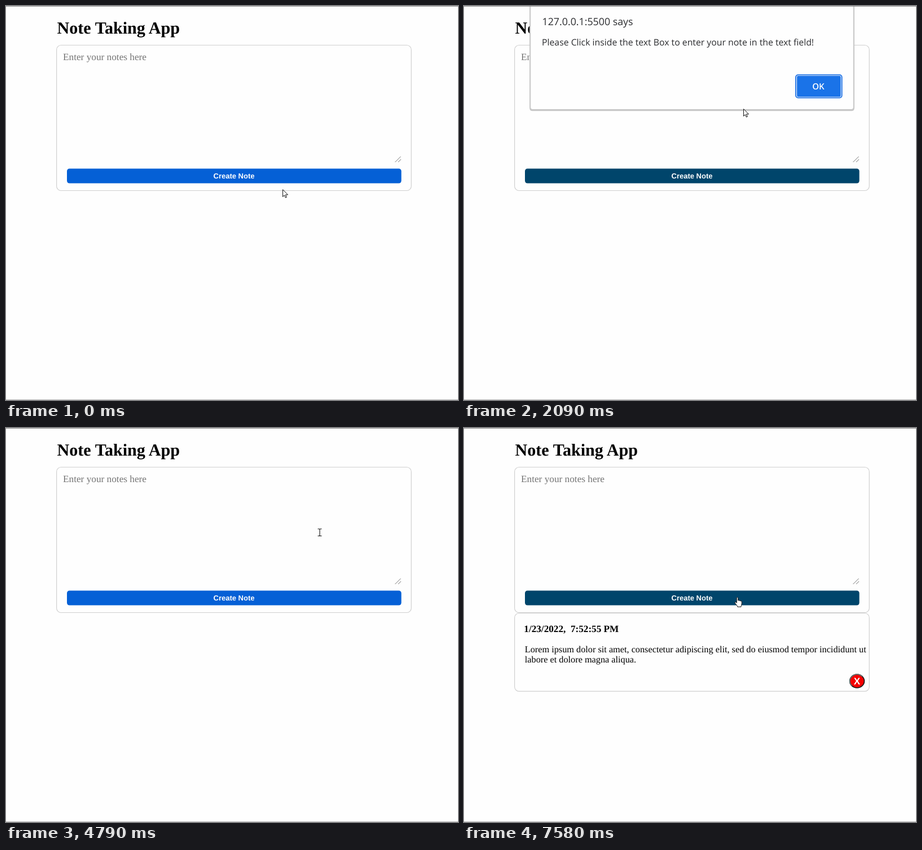
Animation, 801 px wide and 699 px high, one loop 8000 ms. Source, as an HTML page:

```html
<!DOCTYPE html>
<html lang="en">
<head>
<meta charset="utf-8">
<title>Note Taking App</title>
<style>
  html, body { margin: 0; width: 100%; height: 100%; overflow: hidden; background: #fefefe; }
  svg { display: block; }
  text { text-rendering: geometricPrecision; white-space: pre; }
  .serif { font-family: "Liberation Serif", "Times New Roman", serif; }
  .sans { font-family: "Liberation Sans", Arial, sans-serif; font-weight: bold; fill: #fff; text-anchor: middle; }
  .mono { font: 14.91px "Noto Sans Mono", monospace; }
  .ui { font-family: "Open Sans", "Noto Sans", sans-serif; fill: #2b2c2f; }
  .card { fill: none; stroke: #d0d0d0; stroke-width: 1.2; }
  .cursor { fill: #fff; stroke: #111; stroke-width: 1; stroke-linejoin: round; }
</style>
</head>
<body>
<svg width="801" height="699" viewBox="0 0 801 699">
  <defs>
    <clipPath id="okClip"><rect x="590" y="124" width="78" height="37" rx="2"/></clipPath>
  </defs>

  <text class="serif" x="90.5" y="48.5" font-size="30.1" font-weight="bold">Note Taking App</text>
  <rect class="card" x="89.6" y="69.5" width="628.6" height="258" rx="8"/>
  <text class="serif" x="101" y="95.5" font-size="17.25" fill="#757575">Enter your notes here</text>

  <rect id="focus" x="108" y="111.5" width="592.5" height="166.5" rx="4" fill="#fefefe" stroke="#0a5bcb" stroke-width="1.8"/>
  <path d="M689.5 277L699.5 267M695 277L700 272" stroke="#777" fill="none"/>
  <g id="entry" class="mono">
    <text x="117.5" y="136">Lorem ipsum dolor sit amet, consectetur adipiscing elit, sed do</text>
    <text x="117.5" y="155.7">eiusmod tempor incididunt ut labore et dolore magna aliqua.</text>
  </g>
  <rect id="caret" width="1.2" height="19"/>

  <rect id="create" x="108" y="288.5" width="592.6" height="26" rx="4.5"/>
  <text class="sans" x="404" y="306" font-size="13">Create Note</text>

  <g id="note">
    <rect class="card" x="89.6" y="328.5" width="628.6" height="138.6" rx="8"/>
    <text class="serif" x="106.3" y="361.5" font-size="17.2" font-weight="bold">1/23/2022,  7:52:55 PM</text>
    <g class="serif" font-size="16.27">
      <text x="107.8" y="397.5">Lorem ipsum dolor sit amet, consectetur adipiscing elit, sed do eiusmod tempor incididunt ut</text>
      <text x="107.8" y="416">labore et dolore magna aliqua.</text>
    </g>
    <ellipse cx="696.5" cy="449" rx="12.9" ry="12" fill="#f40000" stroke="#1c1c1c" stroke-width="1.7"/>
    <path d="M687.4 457.5A12.9 12 0 0 1 705.6 440.5" fill="none" stroke="#6b6b6b" stroke-width="1.7"/>
    <text class="sans" x="696.5" y="455" font-size="17">X</text>
  </g>

  <g id="dialog">
    <path id="shade" fill="none" stroke="#c6c6c6" stroke-width="3"/>
    <path id="panel" fill="#fefefe" stroke="#c9c9c9" stroke-width="1.2"/>
    <g id="words" class="ui">
      <text x="138.5" y="34" font-size="17.8">127.0.0.1:5500 says</text>
      <text x="138" y="69.8" font-size="15.8">Please Click inside the text Box to enter your note in the text field!</text>
    </g>
    <g id="ok">
      <rect id="ring" x="588" y="122.2" width="81.6" height="40.6" rx="4" fill="#fefefe" stroke="#2a79e6" stroke-width="2"/>
      <rect id="face" x="590" y="124" width="77.6" height="37" rx="2"/>
      <ellipse id="ripple" cx="620" cy="144" rx="32" ry="26" fill="#fff" opacity=".12" clip-path="url(#okClip)"/>
      <text class="ui" x="628" y="148" font-size="15" font-weight="600" text-anchor="middle" style="fill:#fff">OK</text>
    </g>
  </g>

  <path d="M0 .5H801" stroke="#8a8a8a"/>
  <path d="M0 698.5H801" stroke="#b4b4b4"/>

  <path id="arrow" class="cursor" d="M.5 .7V13.4L3.4 10.7L5.3 15.1L7.3 14.2L5.4 9.9H9.5Z"/>
  <path id="hand" class="cursor" d="M3.7 10.3V1.9C3.7 .1 6.2 .1 6.2 1.9V6.2C6.6 5.2 8.3 5.4 8.4 6.6C9 5.8 10.5 6.1 10.6 7.2C11.2 6.6 12.7 6.9 12.7 8.2V11.5C12.7 13.6 11.6 14.4 11.5 17.3H5.2C5.1 15.2 2.4 13 .8 10.6C-.1 9.2 1.3 8.2 2.4 9Z"/>
  <path id="beam" d="M-3.5 -6H-1Q0 -6 0 -5Q0 -6 1 -6H3.5M0 -5V6M-3.5 6.5H-1Q0 6.5 0 5.5Q0 6.5 1 6.5H3.5" fill="none" stroke="#111" stroke-width="1.1"/>
</svg>
<script>
const LOOP = 8000;
const $ = id => document.getElementById(id);
const set = (id, name, value) => $(id).setAttribute(name, value);
const show = (id, on) => set(id, 'visibility', on ? 'visible' : 'hidden');
const within = (t, a, b) => t >= a && t < b;

// time, pointer kind, x, y
const pointer = [
  [0, 'arrow', 490, 325], [130, 'arrow', 482, 312],
  [300, 'hand', 467, 292], [700, 'hand', 464, 292.5],
  [1390, 'arrow', 407, 220], [1510, 'arrow', 411, 222],
  [1660, 'arrow', 403, 218], [1780, 'arrow', 403, 220],
  [1940, 'arrow', 455, 198], [2090, 'arrow', 495, 182],
  [2210, 'arrow', 527, 169], [2330, 'arrow', 549, 161],
  [2480, 'arrow', 579, 157], [2630, 'arrow', 627, 137],
  [2750, 'arrow', 613, 156], [2900, 'arrow', 613, 145],
  [3050, 'arrow', 613, 144], [4410, 'beam', 611.5, 147],
  [4650, 'beam', 560, 181], [4790, 'beam', 556, 185],
  [5390, 'beam', 555.5, 185.5], [6650, 'beam', 530, 212],
  [6770, 'beam', 508, 235], [6920, 'hand', 488, 299],
  [7040, 'hand', 484.5, 303], [7190, 'hand', 483, 302],
  [7430, 'hand', 479.5, 300]
];

// time, dialog opacity, upward shift, sideways tilt
const dialog = [
  [0, 0, 0, 0], [990, .65, 12.5, 2.3], [1110, 1, 0, 0],
  [4410, .65, 12.5, 2.3], [4530, .2, 19, 3.2], [4650, 0, 0, 0]
];

// time, caret x, caret y (x 0 hides it)
const caret = [
  [0, 0, 0], [5080, 117.3, 121], [5670, 0, 0],
  [6100, 117.3, 121], [6500, 645, 141], [6920, 0, 0]
];

const at = (steps, t) => steps.findLast(s => s[0] <= t);

function panelPath(lift, tilt, drop) {
  const l = 117.6 - tilt, r = 690.4 + tilt, b = 183.5 - lift + drop;
  return `M117.6 1L${l} ${b - 4}Q${l} ${b} ${l + 4} ${b}H${r - 4}Q${r} ${b} ${r} ${b - 4}L690.4 1`;
}

function drawPointer(t) {
  const [, kind, x, y] = at(pointer, t);
  for (const id of ['arrow', 'hand', 'beam']) show(id, id === kind);
  set(kind, 'transform', `translate(${x} ${y})`);
}

function drawDialog(t) {
  const [, opacity, lift, tilt] = at(dialog, t);
  set('dialog', 'opacity', opacity);
  set('panel', 'd', panelPath(lift, tilt, 0));
  set('shade', 'd', panelPath(lift, tilt, 1.2));
  set('words', 'transform', `translate(0 ${-lift - .5 * (lift > 0)})`);
  set('ok', 'transform', `translate(${tilt * .7} ${-lift})`);
  set('ring', 'fill', lift ? '#1a73e8' : '#fefefe');
  set('face', 'fill', within(t, 2630, 4410) ? '#307ee3' : '#1a73e8');
  show('ripple', within(t, 4260, 4410));
}

function draw(t) {
  drawDialog(t);
  drawPointer(t);
  const [, x, y] = at(caret, t);
  set('caret', 'x', x);
  set('caret', 'y', y);
  show('caret', x);
  const hover = within(t, 300, 4410) || t >= 6920;
  set('create', 'fill', hover ? '#00456b' : '#0560d6');
  show('focus', within(t, 5080, 7190));
  show('entry', within(t, 6500, 7580));
  show('note', t >= 7580);
}

const start = performance.now();
function tick() {
  draw((performance.now() - start) % LOOP);
  requestAnimationFrame(tick);
}
tick();
</script>
</body>
</html>
```
